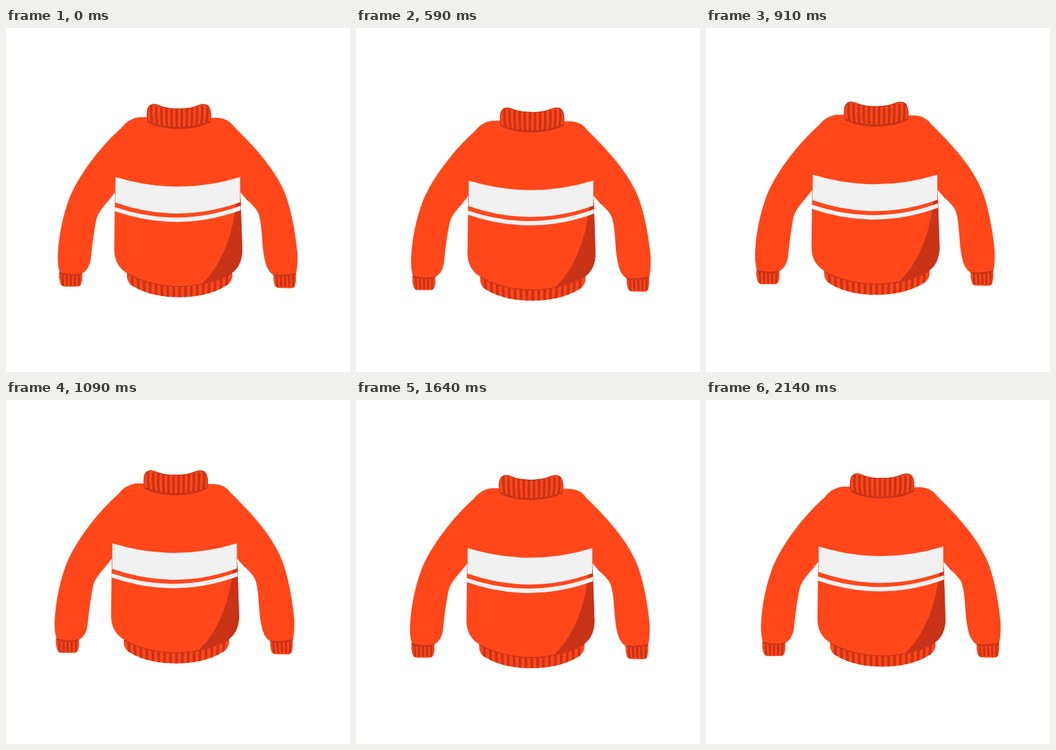
An HTML page that plays this animation: 540 px wide and 540 px high, repeating every 2.19 s.

```html
<!DOCTYPE html>
<html lang="en">
<head>
<meta charset="utf-8">
<title>Wiggling sweater</title>
<style>
  html, body { margin: 0; width: 100%; height: 100%; overflow: hidden; background: #fff; }
  svg { display: block; width: 100%; height: 100%; }
  .main { fill: #ff471a; }
  .shade { fill: #c93318; }
  .white { fill: #f1f1f1; }
  .rib, .seam { fill: none; stroke: #c93318; stroke-linecap: round; }
</style>
</head>
<body>
<svg viewBox="0 0 540 540">
  <defs>
    <path id="torso" d="M222 140 L208 140 Q191 143 181 157 C149 185 114 231 99.500 267
      C89 295 83 326 81.500 354 Q80.500 376 85.500 386 Q104 391 119 386 Q131 379 133 363
      C135 342 138 319 142 300 C146 285 159 275 171 258 L170 345
      Q169 372 190 385 Q228 405 272 405 Q318 404 354 385 Q370 374 371 350
      L368 258 C383 276 393 281 397 293 C403 314 401 341 406 363 Q409 381 420 388
      Q438 391 455 386 Q458 377 457.500 354 C455 327 450 295 440 265
      C426 226 393 189 358 155 Q349 142 333 141 L321 141 Z"/>
    <path id="collar" d="M222.500 148 Q219.500 136 222 127 Q225 119 233 119.300
      C243 121 247 126.500 271 126.500 C294 126.500 299 121 308 119.500
      Q319 118.500 321 129 Q323.500 140 320.500 148 Q300 158.500 271 158.500 Q240 158 222.500 148 Z"/>
    <path id="hem" d="M190.500 384 Q228 404 272 404 Q318 403 354.500 383 Q358 394 348 403
      Q318 422.500 272 422.500 Q224 422.500 195 402.500 Q188 394 190.500 384 Z"/>
    <path id="cuffL" d="M83.500 383 Q102 389 119 385 Q121 394 118 402 Q116.500 406 111 406
      L92 406 Q86 406 84.500 398 Q82.500 391 83.500 383 Z"/>
    <path id="cuffR" d="M420 387 Q438 390 455 385 Q456 395 454 403 Q453 408.500 447 408.500
      L428 408 Q422 408 421 401 Q419 394 420 387 Z"/>
    <clipPath id="torsoClip"><use href="#torso"/></clipPath>
    <clipPath id="hemClip"><use href="#hem"/></clipPath>
    <clipPath id="collarClip"><use href="#collar"/></clipPath>
  </defs>
  <g id="sweater">
    <use href="#hem" class="main"/>
    <g id="hemRibs" clip-path="url(#hemClip)"></g>
    <path class="seam" stroke-width="3" d="M191.500 386 Q228 405 272 405 Q318 404 353.500 385"/>
    <use href="#cuffL" class="main"/>
    <use href="#cuffR" class="main"/>
    <g id="cuffRibs"></g>
    <use href="#torso" class="main"/>
    <path class="shade" clip-path="url(#torsoClip)" d="M362 268 C357 326 337 376 305 404
      L345 404 L380 375 L380 268 Z"/>
    <path class="white" d="M172 234 Q270 264 367.500 234 L367.500 273.500 Q270 308.500 171.500 274 Z"/>
    <path class="white" d="M170.500 281 Q270 315 368.500 279 L368.500 286 Q270 322 170.500 287.500 Z"/>
    <path class="seam" stroke-width="2.500" d="M85 384.500 Q102 390 118 386 M421 388 Q438 390 454 386"/>
    <use href="#collar" class="main"/>
    <g clip-path="url(#collarClip)">
      <g id="collarRibs"></g>
      <use href="#collar" class="seam" stroke-width="2.500"/>
      <path class="seam" stroke-width="3.500" d="M222 147 Q240 157 271 157 Q300 157 321 147"/>
    </g>
  </g>
</svg>
<script>
const LOOP = 2190, FRAMES = 48;

// Knots of [time, offset]
const driftX = [[0, 0], [180, -5], [360, 1.3], [550, 3], [640, 7], [770, -3],
  [1090, -5], [1320, -0.8], [1480, 8], [1640, 3.5], [1860, -3], [2145, 5]];
const driftY = [[0, 0], [315, -8], [360, -7.4], [505, 6.5], [590, 5.5], [770, 2],
  [1090, -9], [1320, -4], [1640, -1.5], [1860, 5], [2145, -4]];

const byId = id => document.getElementById(id);

function addRibs(id, count, width, shape) {
  const group = byId(id);
  for (let i = 0; i < count; i++) {
    const rib = document.createElementNS('http://www.w3.org/2000/svg', 'path');
    rib.setAttribute('class', 'rib');
    rib.setAttribute('stroke-width', width);
    rib.setAttribute('d', shape(i));
    group.append(rib);
  }
}

addRibs('collarRibs', 12, 4, i => {
  const u = (i - 5.5) / 5.5;
  const top = 127 - 4 * u * u, bottom = 156 - 7 * u * u;
  return `M${272 + 44 * u} ${top} Q${272 + 45 * u} ${(top + bottom) / 2} ${272 + 42.5 * u} ${bottom}`;
});
addRibs('hemRibs', 17, 4.2, i => {
  const u = (i - 8) / 8, x = 272.5 + 73.5 * u;
  const top = 405 - 14 * u * u;
  return `M${x + u} ${top} L${x} ${top + 19}`;
});
addRibs('cuffRibs', 5, 3.6, i => `M${88.5 + 6.6 * i} 387 L${89.5 + 6.2 * i} 403`);
addRibs('cuffRibs', 5, 3.6, i => `M${424.5 + 6.6 * i} 389 L${426 + 6.2 * i} 405`);

// Cubic interpolation that keeps the extremes at the knots
function sample(knots, t) {
  const slope = i => (knots[i + 1][1] - knots[i][1]) / (knots[i + 1][0] - knots[i][0]);
  const tangent = i => {
    if (i === 0) return slope(0);
    if (i === knots.length - 1) return slope(i - 1);
    const a = slope(i - 1), b = slope(i);
    return a * b <= 0 ? 0 : 2 * a * b / (a + b);
  };
  let i = 0;
  while (i < knots.length - 2 && t >= knots[i + 1][0]) i++;
  const [t0, v0] = knots[i], [t1, v1] = knots[i + 1];
  const span = t1 - t0, s = Math.min(1, (t - t0) / span), r = 1 - s;
  return v0 * r * r * (1 + 2 * s) + v1 * s * s * (3 - 2 * s)
    + span * s * r * (tangent(i) * r - tangent(i + 1) * s);
}

function draw(now) {
  const step = LOOP / FRAMES;
  const frame = Math.min(FRAMES - 1, Math.floor((now % LOOP + 7) / step));
  const t = frame * step;
  byId('sweater').setAttribute('transform', `translate(${sample(driftX, t)} ${sample(driftY, t)})`);
}

const start = performance.now();
function tick() {
  draw(performance.now() - start);
  requestAnimationFrame(tick);
}
tick();
</script>
</body>
</html>
```
